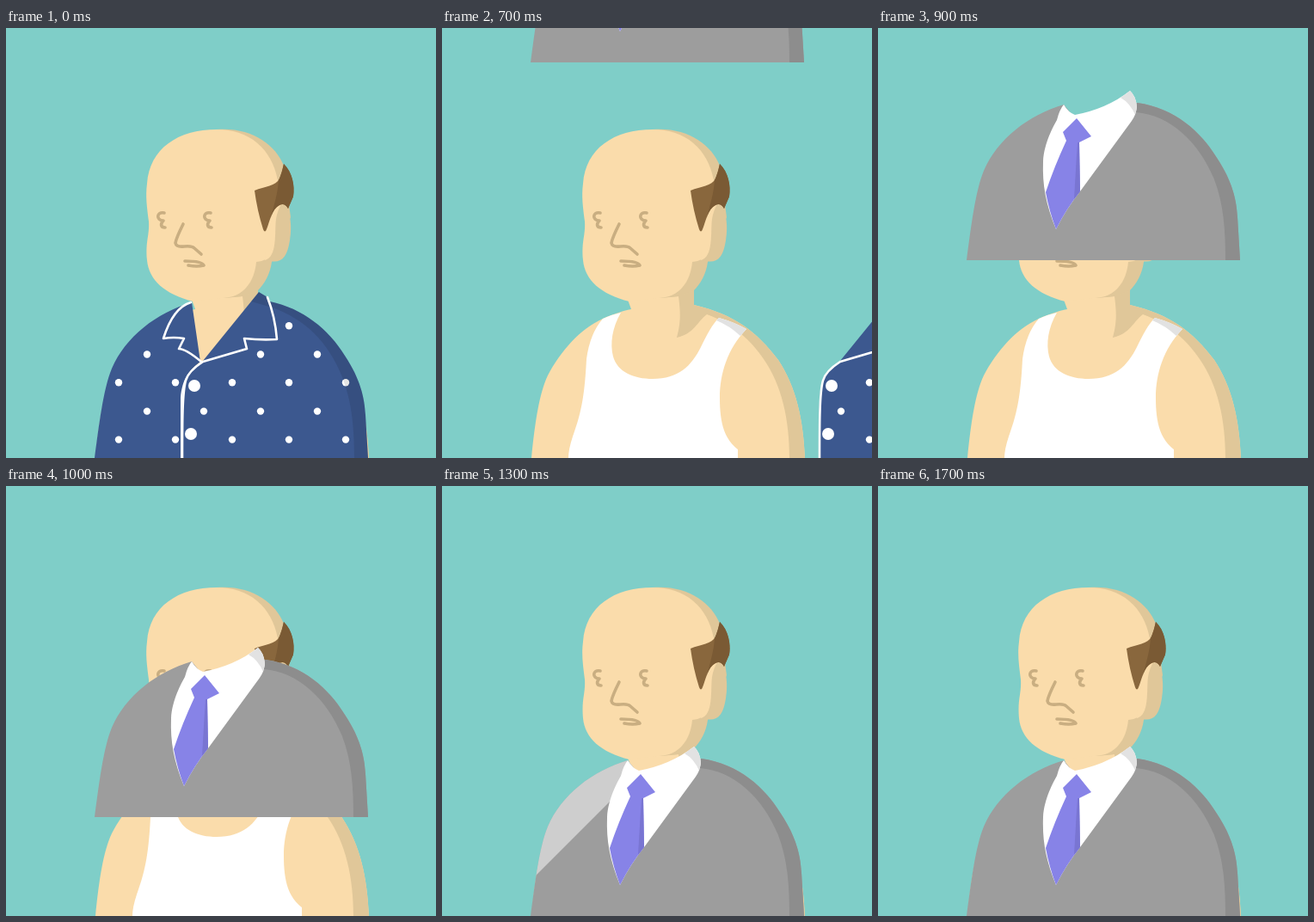
Recreate the animation shown at these times as an HTML page. Size 500 px wide and 500 px high, loop 2.7 s.

```html
<!DOCTYPE html>
<html lang="en">
<head>
<meta charset="utf-8">
<title>Changing clothes</title>
<style>
  html, body { margin: 0; width: 100%; height: 100%; overflow: hidden; background: #7fcec8; }
  svg { display: block; width: 100vw; height: 100vh; }
  .skin { fill: #fadcab; }
  .shade { fill: #e0c799; }
  .white { fill: #fff; }
  .grey { fill: #e2e2e2; }
  .blue { fill: #3c588f; }
  .line { fill: none; stroke: #c9ae81; stroke-width: 3.6; stroke-linecap: round; stroke-linejoin: round; }
  .piping { fill: none; stroke: #fff; stroke-width: 2.6; stroke-linejoin: round; stroke-linecap: round; }
</style>
</head>
<body>
<svg viewBox="0 0 500 500">
  <defs>
    <path id="suitOutline" d="M103 500C108 463 113 420 123 396C139 359 175 331 216 319L229 335L290 320L302 317C345 323 375 350 394 381C412 408 417 430 418 450L421 500Z"/>
    <clipPath id="suitShape"><use href="#suitOutline"/></clipPath>
  </defs>

  <g id="body">
    <path class="skin" d="M104 500C108 460 113 425 123 404C138 376 160 350 187 338C200 332 214 328 220 327L216 316L293 300V322C340 333 366 353 391 386C412 418 420 455 422 500Z"/>
    <path class="shade" d="M253 314L275 312C278 335 277 345 273 360C294 355 296 342 308 333C340 345 360 364 374 385C395 415 404 455 404 500H422C420 455 412 418 391 386C366 353 340 333 293 322V300Z"/>
    <path class="white" d="M187 338Q198 333 208 331C198 348 195 367 199 382C204 400 223 408 245 408C275 408 290 393 301 371C309 355 314 345 322 337Q340 342 354 350C332 373 323 402 323 430C323 461 329 478 344 490V500H147Q147 490 152 475C163 445 166 424 168 385Q172 355 187 338Z"/>
    <path class="grey" d="M322 337Q340 342 354 350L347 358Q334 346 319 340Z"/>
  </g>

  <g id="head">
    <path class="shade" d="M245 118C285 115 313 135 323 160L331 220L309 272C307 287 300 298 293 305L275 312L253 314Z"/>
    <path class="skin" d="M245 118C283 118 309 140 316 177L310 215L309 262Q304 271 291 272C289 295 276 313 253 314L218 318C185 310 166 293 164 270C162 247 167 242 166 225C164 209 162 196 164 181C167 140 200 118 245 118Z"/>
    <path class="shade" d="M319 204C331 208 333 229 330 247C327 266 321 274 306 271L310 218Z"/>
    <path class="skin" d="M320 205C307 211 306 226 302 236L301 270C316 266 312 238 314 222Q316 211 320 205Z"/>
    <path fill="#89673d" d="M289 189C301 184 314 184 318 175Q321 167 323 158C333 168 336 183 334 196L328 210Q324 203 318 206C309 211 307 224 303 234Q301 239 299 234Q292 212 289 189Z"/>
    <path fill="#7a5a34" d="M323 158C333 168 336 183 334 196L328 210Q324 203 318 206C313 208 310 214 308 220C312 205 316 192 317 177Q321 169 323 158Z"/>
    <path class="line" d="M184 215C175 213 174 224 183 224C179 228 180 232 185 232M238 215C229 213 228 224 237 224C233 228 234 232 239 232M206 228C201 238 198 244 197 250Q198 255 207 254Q216 253 219 256L227 263M208 271Q228 271 230 276Q222 278 212 276"/>
  </g>

  <g id="pajamaLeft">
    <path class="blue" d="M103 500C108 463 113 420 123 396C139 359 175 331 216 319L226 388C212 399 205 408 203 430V500Z"/>
    <g id="dotsLeft"></g>
    <path class="piping" d="M215 319C198 324 189 342 183 361Q195 359 207 361L201 373Q209 373 227 388"/>
  </g>
  <g id="pajamaRight">
    <path class="blue" d="M294 307L304 313L307 318C345 326 375 350 394 381C412 408 417 430 418 450L421 500H205C205 460 203 424 209 409Q214 399 229 387Z"/>
    <g id="dotsRight"></g>
    <path opacity=".1" d="M294 307L304 313L307 318C345 326 375 350 394 381C412 408 417 430 418 450L421 500H405C405 460 401 432 391 406C375 365 347 338 309 325L285 318Z"/>
    <path class="piping" d="M304 313Q313 336 315 362Q296 363 277 361L280 373L229 388Q212 399 209 410C205 424 205 460 205 500"/>
    <g class="white"><circle cx="219" cy="416" r="7"/><circle cx="215" cy="472" r="7"/></g>
  </g>

  <g id="suit">
    <use href="#suitOutline" fill="#9d9d9d"/>
    <path fill="#8d8d8d" d="M301 317C345 323 375 350 394 381C412 408 417 430 418 450L421 500H404C404 465 402 435 391 406C373 362 339 331 300 328Z"/>
    <path class="white" d="M216 319Q221 328 229 331Q266 324 293 303Q300 309 301 322Q300 331 295 338L235 420Q219 440 207 464C195 434 191 413 192 385C193 364 204 344 208 337Q211 325 216 319Z"/>
    <path class="grey" d="M282 311L293 303Q300 309 301 322L299 331Q293 317 282 311Z"/>
    <path fill="#8783e7" d="M231 335L248 356L234 363L235 420Q219 440 207 464Q199 443 195 421Q205 391 219 361L215 351Z"/>
    <path fill="#7975d2" d="M234 363L235 420L228 429Q230 393 232 363Z"/>
    <g clip-path="url(#suitShape)">
      <path id="shine" fill="#fff" opacity=".5" d="M0 0H-87L-587 500H-500Z"/>
    </g>
  </g>
</svg>
<script>
const STEP = 100, LOOP = 2700;
const $ = id => document.getElementById(id);
const place = (id, transform) => $(id).setAttribute('transform', transform);

function addDots(id, y, first, last) {
  for (let x = first; x <= last; x += 66) {
    const dot = document.createElementNS('http://www.w3.org/2000/svg', 'circle');
    for (const [key, value] of Object.entries({ cx: x, cy: y, r: 4.2, fill: '#fff' })) dot.setAttribute(key, value);
    $(id).append(dot);
  }
}
addDots('dotsLeft', 379.5, 164, 164);
addDots('dotsLeft', 412.3, 131, 197);
addDots('dotsLeft', 445.6, 164, 164);
addDots('dotsLeft', 478.6, 131, 197);
addDots('dotsRight', 346.3, 329, 329);
addDots('dotsRight', 379.5, 296, 362);
addDots('dotsRight', 412.3, 263, 395);
addDots('dotsRight', 445.6, 230, 362);
addDots('dotsRight', 478.6, 263, 395);

function draw(now) {
  // Movement advances in discrete steps after a half-second hold.
  const step = Math.max(0, Math.floor((now % LOOP - 500) / STEP) + 1);
  place('pajamaLeft', `translate(${-78 * step})`);
  place('pajamaRight', `translate(${78 * step})`);
  // The suit drops in, squashes on landing, then a shine crosses it.
  place('suit', step === 7
    ? 'translate(262 500) scale(1.02 .98) translate(-262 -500)'
    : `translate(0 ${115 * Math.min(0, step - 7)})`);
  place('shine', `translate(${562 + 130 * (step - 9)})`);
}

const start = performance.now();
function tick() {
  draw(performance.now() - start);
  requestAnimationFrame(tick);
}
tick();
</script>
</body>
</html>
```
